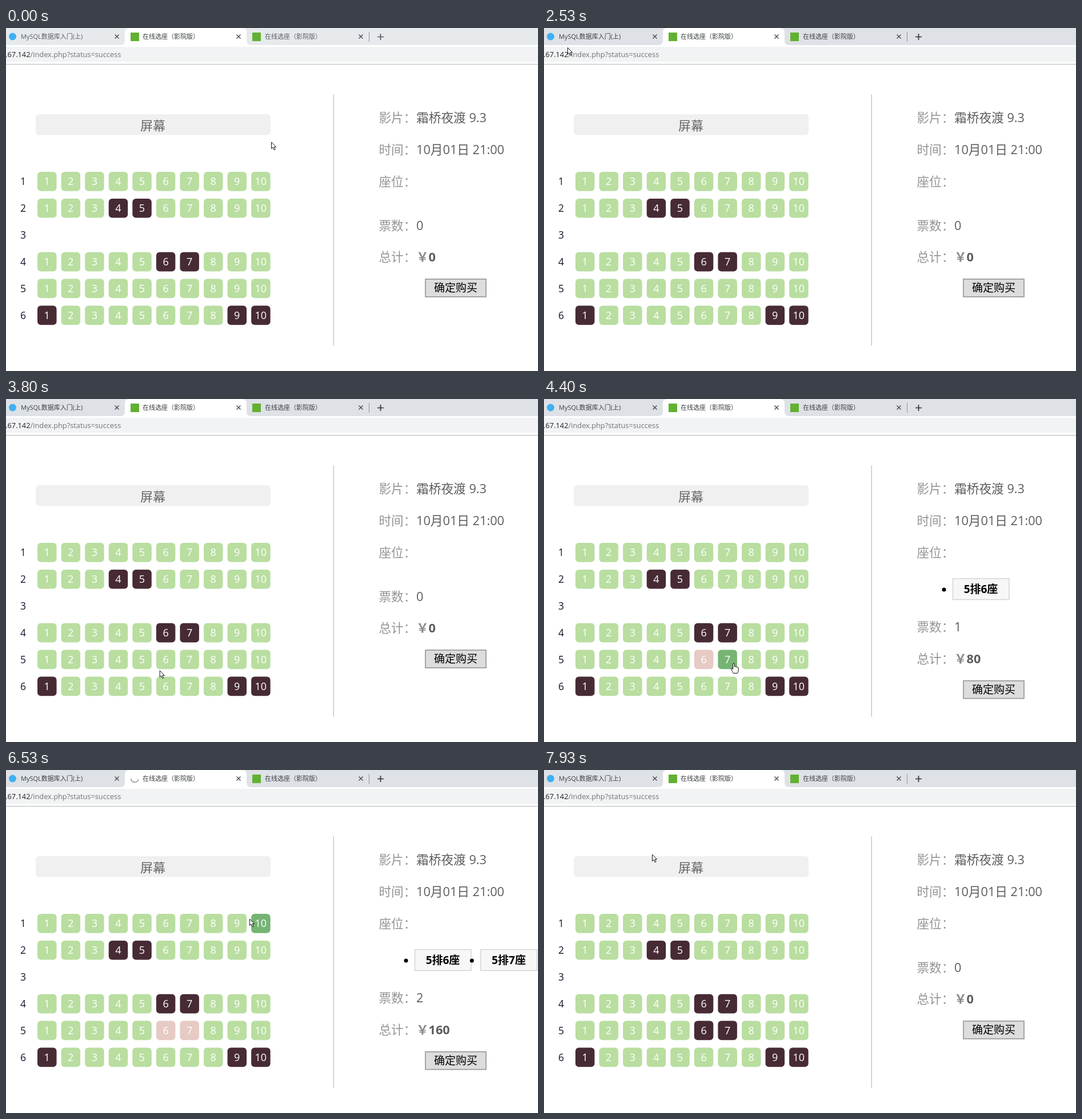
Write an HTML page that moves like this. It is 931x601 px and loops after 8 s.

```html
<!DOCTYPE html>
<html lang="zh-CN">
<head>
<meta charset="utf-8">
<title>在线选座</title>
<style>
  html, body { margin: 0; width: 100%; height: 100%; overflow: hidden; background: #fff; }
  svg { display: block; width: 931px; height: 601px; }
  text { font-family: "Open Sans", "Noto Sans CJK SC", "Noto Sans CJK", sans-serif; white-space: pre; }
</style>
</head>
<body>
<svg id="stage" viewBox="0 0 931 601" xmlns="http://www.w3.org/2000/svg"></svg>
<script>
const LOOP = 8000, TICK = 1000 / 15;
const FREE = '#b9dea0', SOLD = '#472b34', HOVER = '#76b474', PICKED = '#e6cac4';
const GREEN = '#62b132';

// Moments at which the state changes, in ms
const FOCUS = 2260, PICK_A = 4000, PICK_B = 4660, SUBMIT = 5930, BLANK = 6860, CURSOR_OFF = 7050, RELOAD = 7720;

// Pointer path: time, x, y
const PATH = [
  [0, 464, 199.5], [330, 464, 199.5], [660, 455, 203], [1130, 442, 188], [1330, 442, 188],
  [1533, 300, 292], [1600, 275, 298.5], [1730, 235, 300], [2130, 5, 37], [2200, 5, 37],
  [2530, 41, 34], [2670, 41, 30], [3333, 258, 432], [3400, 254, 502.5], [3530, 245, 503],
  [3930, 280, 462], [4200, 284, 462], [4333, 318, 463], [4400, 332, 463], [4730, 332, 463],
  [5200, 700, 524], [5600, 790, 512], [6070, 790, 512], [6400, 480, 290], [6533, 426, 260.5],
  [6930, 395, 262], [7000, 129, 266], [7730, 150, 235], [7933, 189, 147.5], [8000, 189, 147.5]
];

const stage = document.getElementById('stage');

function add(tag, attrs, parent = stage, content) {
  const node = document.createElementNS('http://www.w3.org/2000/svg', tag);
  for (const key in attrs) node.setAttribute(key, attrs[key]);
  if (content !== undefined) node.textContent = content;
  parent.appendChild(node);
  return node;
}
const group = parent => add('g', {}, parent);
const rect = (x, y, width, height, fill, parent, more) =>
  add('rect', { x, y, width, height, fill, ...more }, parent);
const label = (x, y, size, fill, content, parent, more) =>
  add('text', { x, y, 'font-size': size, fill, ...more }, parent, content);
const line = (d, stroke, width, parent, more) =>
  add('path', { d, stroke, 'stroke-width': width, fill: 'none', ...more }, parent);
const show = (node, on) => node.setAttribute('display', on ? 'inline' : 'none');
const middle = { 'text-anchor': 'middle' };
const bold = { 'font-weight': 700 };

// Browser frame
rect(0, 0, 931, 601, '#fff');
const strip = rect(0, 0, 931, 30, '#e7eaed');
add('path', { d: 'M200 30Q208 30 208 22V8Q208 0 216 0H413Q421 0 421 8V22Q421 30 429 30Z', fill: '#fff' });
add('circle', { cx: 11.5, cy: 15, r: 6.5, fill: '#3eb0f2' });
const tabIcon = rect(218, 8, 15, 15, GREEN);
rect(431, 8, 15, 15, GREEN);
const tabInk = [
  label(26, 19, 11, '#3c4043', 'MySQL数据库入门(上)'),
  label(453, 19, 11, '#3c4043', '在线选座（影院版）')
];
const title = label(239, 19, 11, '#3c4043', '');
for (const x of [194, 407, 621]) line(`M${x - 3.5} 11.5l7 7m0 -7l-7 7`, '#45494d', 1.4);
const plus = line('M655.5 10v11M650 15.5h11', '#3c4043', 1.7);
line('M635.5 7v17', '#8d9298', 1);
rect(0, 33, 931, 26, '#f1f3f4');
label(42.5, 50.5, 12.8, '#202124', '.67.142', stage, { 'text-anchor': 'end' });
const url = label(42.5, 50.5, 12.8, '#70757a', '');
line('M0 63.5H931', '#b1b4b6', 1);
const spinner = line('M-6.5 0A6.5 6.5 0 0 0 6.3 1.6', '#9a9da2', 1.8);

// Page
const page = group();
rect(52, 151, 411, 36.5, '#f0f0f0', page, { rx: 6 });
label(257, 178.5, 22, '#666', '屏幕', page, middle);
line('M573.25 117V557', '#8c8c8c', 1.4, page, { 'stroke-dasharray': '1 1' });

const seats = [];
const soldSeats = new Set(['2_4', '2_5', '4_6', '4_7', '6_1', '6_9', '6_10']);
const PICKS = { '5_6': PICK_A, '5_7': PICK_B };
for (let row = 1; row <= 6; row++) {
  const y = 252 + (row - 1) * 46.9;
  label(30, y + 23.3, 17.5, '#14182c', row, page, middle);
  if (row === 3) continue;
  for (let col = 1; col <= 10; col++) {
    const x = 55 + (col - 1) * 41.57;
    const box = rect(x, y, 33.5, 33.7, FREE, page, { rx: 6 });
    label(x + 16.7, y + 23.3, 18, '#fff', col, page, middle);
    seats.push({ x, y, box, id: row + '_' + col });
  }
}

function field(y, name, value, parent) {
  label(652.5, y, 21.6, '#949494', name + '：', parent);
  return label(718, y, 21.7, '#5c5c5c', value, parent);
}
field(164.7, '影片', '霜桥夜渡 9.3', page);
field(220.5, '时间', '10月01日 21:00', page);
field(276.5, '座位', '', page);

const totals = group(page);
const count = field(353.7, '票数', '0', totals);
field(409.2, '总计', '', totals);
label(718, 409.2, 21.7, '#8a8a8a', '￥', totals, bold);
const price = label(739.5, 409.2, 21.7, '#5c5c5c', '0', totals, bold);
rect(734, 440, 106, 31, '#ddd', totals, { stroke: '#999', 'stroke-width': 1.7 });
label(787, 462, 19, '#000', '确定购买', totals, middle);

const items = [6, 7].map((col, i) => {
  const item = group(page), x = 715 + i * 115.3;
  add('circle', { cx: x - 15, cy: 334, r: 3.5, fill: '#000' }, item);
  rect(x + 0.5, 314.7, 98.5, 36.8, '#f7f7f7', item, { stroke: '#d0d0d0', 'stroke-width': 1.3 });
  label(x + 49.5, 340, 19, '#000', `5排${col}座`, item, { ...middle, ...bold });
  return item;
});

// Pointer
const ink = { fill: '#fff', stroke: '#111', 'stroke-width': 1, 'stroke-linejoin': 'round' };
const arrow = add('path', { d: 'M.5 .5V12L3.2 9.6L5.2 14.2L7.2 13.3L5.2 8.9H8.6Z', ...ink });
const hand = add('path', {
  d: 'M-1.3 1Q0 -.6 1.3 1V6Q2.6 5 3.6 6.4Q5 5.6 6 7Q7.6 6.4 8.2 8V12Q8 15 6.4 17.5H-.6Q-2.6 13.6 -4.6 10.6Q-4.6 8.4 -2.6 9.2L-1.3 10.6Z',
  ...ink
});

function pointerAt(t) {
  if (t <= 0) return [PATH[0][1], PATH[0][2]];
  let i = 1;
  while (i < PATH.length - 1 && PATH[i][0] < t) i++;
  const [t0, x0, y0] = PATH[i - 1], [t1, x1, y1] = PATH[i];
  const k = Math.min(1, (t - t0) / (t1 - t0));
  return [x0 + (x1 - x0) * k, y0 + (y1 - y0) * k];
}

const seatUnder = ([x, y]) =>
  seats.find(s => x >= s.x && x <= s.x + 33.5 && y >= s.y && y <= s.y + 33.7);

function seatColor(seat, t, hovered) {
  if (soldSeats.has(seat.id)) return SOLD;
  const pick = PICKS[seat.id];
  if (pick && t >= RELOAD) return SOLD;
  if (pick && t >= pick) return PICKED;
  return seat === hovered ? HOVER : FREE;
}

function draw(time) {
  const t = Math.floor(time / TICK + 0.1) * TICK;
  const blank = t >= BLANK && t < RELOAD;
  const focused = t >= FOCUS;
  const picked = t >= RELOAD ? 0 : (t >= PICK_A) + (t >= PICK_B);

  strip.setAttribute('fill', focused ? '#dee1e6' : '#e7eaed');
  for (const node of tabInk) node.setAttribute('fill', focused ? '#3c4043' : '#5a5e63');
  plus.setAttribute('stroke', focused ? '#303338' : '#55595e');
  title.textContent = blank ? '在线选座订座（影院版）' : '在线选座（影院版）';
  url.textContent = blank ? '/success.php?ids=cart-item-5_6|cart-item-5_7|' : '/index.php?status=success';

  const loading = t >= SUBMIT && t < BLANK;
  show(tabIcon, !loading);
  show(spinner, loading);
  spinner.setAttribute('transform', `translate(225.3 15) rotate(${-(t - 6533) * 0.24})`);

  show(page, !blank);
  count.textContent = picked;
  price.textContent = picked * 80;
  totals.setAttribute('transform', `translate(0 ${picked ? 53.7 : 0})`);
  items.forEach((item, i) => show(item, picked > i));

  // Hover colour trails the pointer by one tick
  const hovered = seatUnder(pointerAt(t - TICK));
  for (const seat of seats) seat.box.setAttribute('fill', seatColor(seat, t, hovered));

  const pos = pointerAt(t), over = seatUnder(pos);
  const visible = t < CURSOR_OFF || t >= RELOAD;
  const pointing = !blank && over && over === hovered && !soldSeats.has(over.id);
  show(hand, visible && pointing);
  show(arrow, visible && !pointing);
  for (const node of [arrow, hand]) node.setAttribute('transform', `translate(${pos[0]} ${pos[1]})`);
}

const start = performance.now();
function frame() {
  draw((performance.now() - start) % LOOP);
  requestAnimationFrame(frame);
}
frame();
</script>
</body>
</html>
```
